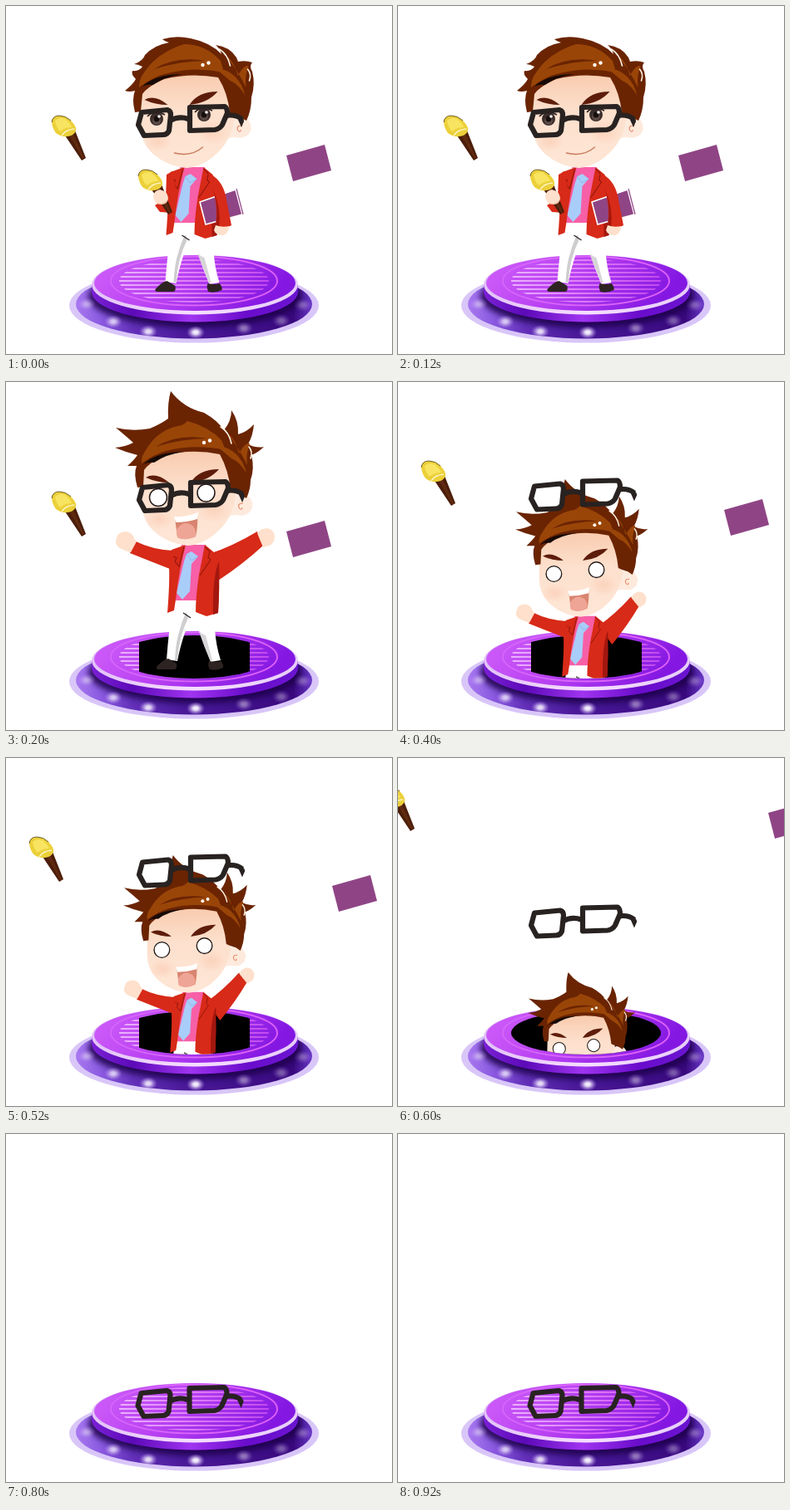
Recreate the animation shown at these times as an HTML page. Size 464x419 px, loop 1 s.

```html
<!DOCTYPE html>
<html lang="en">
<head>
<meta charset="utf-8">
<title>Trapdoor stage</title>
<style>
html, body { margin: 0; width: 100%; height: 100%; overflow: hidden; background: #fff; }
svg { display: block; width: 100vw; height: 100vh; }
</style>
</head>
<body>
<svg viewBox="0 0 464 419" xmlns="http://www.w3.org/2000/svg">
<defs>
  <linearGradient id="base">
    <stop offset="0" stop-color="#a878f0"/><stop offset=".1" stop-color="#8c5ce2"/>
    <stop offset=".24" stop-color="#6230b8"/><stop offset=".45" stop-color="#4a1a9a"/>
    <stop offset=".75" stop-color="#3f0f88"/><stop offset=".92" stop-color="#38087c"/>
    <stop offset="1" stop-color="#6a38c8"/>
  </linearGradient>
  <linearGradient id="side">
    <stop offset="0" stop-color="#7a20d4"/><stop offset=".2" stop-color="#5c0ab8"/>
    <stop offset=".48" stop-color="#a034f0"/><stop offset=".75" stop-color="#6a0ccc"/>
    <stop offset="1" stop-color="#6a14d0"/>
  </linearGradient>
  <linearGradient id="top" x2="1" y2=".25">
    <stop offset="0" stop-color="#d060fa"/><stop offset=".5" stop-color="#b840f2"/>
    <stop offset="1" stop-color="#8418e2"/>
  </linearGradient>
  <linearGradient id="rim">
    <stop offset="0" stop-color="#e2c2fa"/><stop offset=".5" stop-color="#f6defe"/>
    <stop offset="1" stop-color="#e6ccfb"/>
  </linearGradient>
  <linearGradient id="line" gradientUnits="userSpaceOnUse" x1="136" x2="316" y1="0" y2="0">
    <stop offset="0" stop-color="#f8d2ff"/><stop offset=".5" stop-color="#ec94fa"/>
    <stop offset="1" stop-color="#d656f2"/>
  </linearGradient>
  <linearGradient id="ring">
    <stop offset="0" stop-color="#d466fa"/><stop offset="1" stop-color="#e263f8"/>
  </linearGradient>
  <radialGradient id="glow">
    <stop offset="0" stop-color="#fff"/><stop offset=".3" stop-color="#f4eaff" stop-opacity=".9"/>
    <stop offset="1" stop-color="#b48cf0" stop-opacity="0"/>
  </radialGradient>
  <radialGradient id="blush">
    <stop offset="0" stop-color="#f8bfa4" stop-opacity=".45"/><stop offset="1" stop-color="#f8bfa4" stop-opacity="0"/>
  </radialGradient>
  <linearGradient id="skin" x2="0" y2="1">
    <stop offset="0" stop-color="#f8cbae"/><stop offset=".4" stop-color="#fde0cd"/>
    <stop offset="1" stop-color="#fee6d6"/>
  </linearGradient>
  <filter id="soft" x="-20%" y="-40%" width="140%" height="180%"><feGaussianBlur stdDeviation="3.5"/></filter>
  <clipPath id="deck"><ellipse cx="226" cy="331" rx="90" ry="26"/></clipPath>
  <clipPath id="baseClip"><ellipse cx="226" cy="359" rx="142" ry="41.5"/></clipPath>
  <clipPath id="above"><path d="M0 0H464V331H316A90 26 0 0 1 136 331H0Z"/></clipPath>
  <clipPath id="slot"><rect x="160" y="300" width="133" height="62"/></clipPath>

  <g id="mic">
    <path d="M71 156L83 150L96 183L91 186Z" fill="#4c1e0a"/>
    <path d="M76 155L80 153L94 183L92 184Z" fill="#5f2a10"/>
    <path d="M55 139Q56 132 64 132Q72 132 78 138Q85 145 84 150Q82 156 74 157Q66 158 60 153Q55 146 55 139Z" fill="#ecd03a"/>
    <path d="M59 138Q64 133 71 136Q78 142 79 146Q71 146 65 151Q60 146 59 138Z" fill="#f8e460"/>
    <path d="M67 156Q71 149 82 148" fill="none" stroke="#fbf2c0" stroke-width="1.6"/>
    <path d="M55 140Q56 132 64 132Q72 132 78 138" fill="none" stroke="#4a3c18" stroke-width=".8"/>
  </g>
  <path id="book" d="M337 180L383 167L391 198L345 211Z" fill="#8f4585"/>
</defs>

<g id="stage">
  <ellipse cx="226" cy="360.5" rx="150" ry="45" fill="#d9c6f8"/>
  <ellipse cx="226" cy="359" rx="142" ry="41.5" fill="url(#base)"/>
  <g clip-path="url(#baseClip)">
    <ellipse cx="227" cy="350" rx="128" ry="37" fill="#1c0348" opacity=".85" filter="url(#soft)"/>
    <g id="lights"></g>
  </g>
  <path d="M103 335V344.5A124 36 0 0 0 351 344.5V335Z" fill="url(#side)"/>
  <ellipse cx="227" cy="335.5" rx="124" ry="36" fill="url(#rim)"/>
  <ellipse cx="227" cy="333.5" rx="121" ry="33.5" fill="url(#top)"/>
  <ellipse cx="226" cy="331" rx="100" ry="29.5" fill="none" stroke="url(#ring)" stroke-width="1.8"/>
  <g id="stripes" clip-path="url(#deck)" stroke="url(#line)" stroke-width="1.7"></g>
</g>
<ellipse id="hole" cx="226" cy="331" rx="90" ry="26"/>

<g id="clip"><g id="man">
  <g id="legs">
    <path d="M201 262H230L226 278Q213 300 206 336L193 334Q196 296 201 262Z" fill="#fff"/>
    <path d="M214 263H253L251 296Q252 316 258 335L246 337Q238 318 232 300L219 276Z" fill="#fff"/>
    <path d="M217 277Q212 286 209 298Q204 312 203 335H206Q208 306 219 284Z" fill="#cfcdd0"/>
    <path d="M232 300Q236 304 240 305L248 335L246 336Q238 318 232 300Z" fill="#d7d5d8"/>
    <path d="M213 278L222 284" stroke="#2b2324" stroke-width="1.4"/>
    <path d="M181 343Q189 334 195 333L205 339Q206 345 203 346H184Q180 346 181 343Z" fill="#2d2422"/>
    <path d="M244 336Q252 338 258 336Q262 340 261 344Q253 348 245 346Q242 341 244 336Z" fill="#2d2422"/>
  </g>
  <path d="M211 196H240L234 263H202Z" fill="#f75fa6"/>
  <path d="M217 207L223 204L231 210L223 219L221 252L212 262L205 254L214 216Z" fill="#a9cdf9"/>
  <path d="M217 207L223 215L231 210" fill="none" stroke="#8db6ec"/>
  <g id="armsUp" fill="#d72a18">
    <path d="M154 191Q176 202 201 203L197 225Q174 216 149 206Z"/>
    <path d="M133 188Q134 181 143 180Q151 180 154 188L157 192L150 205Q142 203 135 199Q130 194 133 188Z" fill="#fee0cc"/>
    <g id="rightArm">
      <path d="M244 207Q272 198 302 180L309 197Q284 220 255 239Z"/>
      <path d="M302 182Q306 176 314 176Q323 178 323 187Q322 195 316 197L309 199Z" fill="#fee0cc"/>
    </g>
  </g>
  <path d="M199 202L216 196Q208 226 204 262L202 275L194 278Q197 240 196 222Z" fill="#d72a18"/>
  <path d="M239 196L250 205Q258 224 255 278L241 282L228 277Q228 258 232 232Z" fill="#d72a18"/>
  <path d="M214 198L208 222L203 216L205 212L201 210M239 198L245 204L243 211L246 214L233 233" fill="none" stroke="#94160e" stroke-width="1.1"/>
  <path d="M256 216Q248 234 249 280L255 278Q257 246 256 216Z" fill="#a3170f"/>
  <g id="hold" transform="translate(1.5 2)">
    <path d="M233 236L276 221L284 251L240 263Z" fill="#8f4585" stroke="#fff" stroke-width="1.6"/>
    <path d="M277 220L285 251" stroke="#8f4585" stroke-width="1.2"/>
    <path d="M243 201Q259 208 264 228L271 264Q261 270 252 266Q255 242 249 222Z" fill="#d72a18"/>
    <path d="M249 222Q256 241 252 266L256 267Q259 242 249 222Z" fill="#a3170f"/>
    <path d="M252 264Q260 267 268 265Q268 274 261 276Q252 276 250 270Z" fill="#fee0cc"/>
    <path d="M200 199L193 203L192 232L179 240L185 248L199 249L205 224Z" fill="#d72a18"/>
    <use href="#mic" x="104" y="65"/>
    <path d="M177 229Q178 222 185 221Q194 223 195 231Q195 238 187 239Q178 239 177 229Z" fill="#fee0cc"/>
    <path d="M183 238Q190 240 194 234" fill="none" stroke="#e8b095"/>
  </g>

  <g id="head">
    <path d="M272 139Q280 131 290 136Q299 144 295 154Q289 163 277 160L268 161Z" fill="#feeadd"/>
    <path d="M285 146Q278 146 280 151Q283 156 284 151" fill="none" stroke="#e58a68" stroke-width="1.2"/>
    <path d="M164 98Q200 76 262 86L276 110Q280 150 262 172Q243 195 219 197Q194 195 176 178Q164 166 163 146Z" fill="url(#skin)"/>
    <ellipse cx="184" cy="165" rx="18" ry="13" fill="url(#blush)"/>
    <ellipse cx="250" cy="154" rx="20" ry="15" fill="url(#blush)"/>
    <g id="calmHair" transform="translate(1.5 2)" fill="#6a2402">
      <path d="M162 127L155 128Q151 112 155 102Q148 104 143 102Q153 94 156 88Q150 82 152 78Q160 79 164 73Q158 70 154 70Q165 66 167 59Q178 47 196 44Q190 42 188 40Q204 35 222 39Q246 44 259 58Q257 51 252 47Q269 49 277 62L279 67Q288 65 296 68Q292 72 296 79Q300 94 295 110Q295 126 289 138L283 135Q276 133 269 129Q267 105 255 86Q222 80 190 88Q170 97 164 106Z"/>
      <path d="M166 80Q182 56 214 46Q240 46 258 66L262 80Q226 72 190 82Q176 86 160 98Q160 88 166 80Z" fill="#9a4508"/>
      <path d="M178 76Q204 60 240 66Q210 66 178 76Z" fill="#6a2402"/>
    </g>
    <g id="wildHair" fill="#6a2402">
      <path d="M165 126L158 127Q153 110 157 101L146 101Q154 94 158 88Q145 85 131 79Q144 78 153 73Q144 65 132 55Q152 60 173 56Q187 50 195 44Q194 25 198 11Q213 31 238 37Q254 46 262 58Q271 47 271 34Q280 47 279 63Q290 60 298 51Q297 64 291 75Q301 80 310 78Q303 85 295 88Q299 104 294 118Q294 129 289 140L283 136Q276 134 270 131Q268 107 257 87Q224 80 191 88Q172 97 166 106Z"/>
      <path d="M168 82Q182 58 207 53Q214 52 218 47Q244 54 259 70L264 82Q226 74 192 83Q178 87 163 98Q162 90 168 82Z" fill="#9a4508"/>
      <path d="M180 78Q206 62 242 68Q212 68 180 78Z" fill="#6a2402"/>
    </g>
    <path d="M164 100Q180 84 214 84Q192 87 178 97Q170 96 164 100Z" fill="#160a07"/>
    <path d="M252 76Q282 80 289 110Q281 96 271 92ZM264 60Q276 68 280 86Q288 72 293 74Q288 88 290 100Q278 76 264 60Z" fill="#9a4508"/>
    <path d="M258 54Q268 60 271 74M292 78Q297 84 294 92" fill="none" stroke="#fff3e4" stroke-width="1.6" stroke-linecap="round"/>
    <circle cx="238" cy="73" r="2.2" fill="#fff"/><circle cx="245" cy="70.5" r="2.2" fill="#fff"/>
    <path d="M168 115Q180 108 196 121Q181 121 168 115ZM256 105Q232 105 222 121Q244 119 256 105Z" fill="#5e1d0b"/>
    <g id="calmFace">
      <g id="irises"></g>
      <path d="M204 179Q224 184 238 172" fill="none" stroke="#c87a5c" stroke-width="1.4" stroke-linecap="round"/>
    </g>
    <g id="shock">
      <g fill="#fff" stroke="#221a18" stroke-width="1.5">
        <circle cx="183" cy="139" r="10.5"/><circle cx="240.5" cy="133.5" r="10.5"/>
      </g>
      <path d="M203 164Q217 164 230 158Q231 174 228 186Q216 192 206 187Z" fill="#d88470"/>
      <path d="M202 162Q217 163 231 157L230 165Q217 169 204 169Z" fill="#fff"/>
      <path d="M205 178Q212 167 221 171Q229 174 228 186Q216 192 206 187Z" fill="#efa596"/>
    </g>
  </g>
</g></g>

<g id="glasses" fill="none" stroke="#282221" stroke-width="6.2" stroke-linejoin="round">
  <path d="M164 127L195 124Q199 125 199 130L197 149Q195 154 190 154L167 155L160 142Z"/>
  <path d="M222 121L264 120Q267 122 267 128L261 142Q258 147 252 148L222 149Z"/>
  <path d="M198 137Q209 131 220 135"/>
  <path d="M265 131Q277 129 284 135"/>
  <path d="M279 131Q288 133 287 138L284 145L280 136Z" fill="#282221" stroke="none"/>
</g>
<use id="flyMic" href="#mic"/>
<use id="flyBook" href="#book"/>
</svg>
<script>
const $ = id => document.getElementById(id);
const STEP = 200;

// x, y, opacity
const lights = [[97, 359, .45], [129, 380, .75], [171, 392, .9], [228, 393, 1],
  [286, 388, .45], [331, 379, .35], [357, 360, .3]];
$('lights').innerHTML = lights.map(([x, y, o]) =>
  `<ellipse cx="${x}" cy="${y}" rx="11" ry="8" fill="url(#glow)" opacity="${o}"/>`).join('');

let rows = '';
for (let y = 306; y <= 356; y += 5) rows += `<path d="M136 ${y}H316"/>`;
$('stripes').innerHTML = rows;

$('irises').innerHTML = [[182.5, 138], [239.5, 133]].map(([x, y]) => `
  <g transform="translate(${x} ${y})">
    <circle r="8" fill="#3a2c2a"/><circle cy="2" r="5" fill="#5c4a46"/><circle r="3.4" fill="#16100f"/>
    <circle cx="3" cy="-3" r="1.8" fill="#fff"/>
    <path d="M-11 -3Q-3 -12 10 -5" fill="none" stroke="#2a1c19" stroke-width="1.6"/>
  </g>`).join('');

// man: [x, y, scale]; other entries are offsets, null hides the part
const poses = [
  { man: [-1.5, -2, 1], glasses: [-1, 1], mic: [0, 0], book: [0, 0], calm: true },
  { man: [0, 0, 1], glasses: [0, 0], mic: [0, 0], book: [0, 0], hole: 'slot' },
  { man: [24.5, 107.3, .89], glasses: [0, -1.5], mic: [-27, -37], book: [55, -26], hole: 'slot', sink: true, raise: true },
  { man: [62, 250, .72], glasses: [0, 59.5], mic: [-76, -98], book: [108, -114], hole: 'full', sink: true },
  { man: null, glasses: [-1.5, 185], mic: null, book: null }
];

const show = (id, on) => $(id).style.display = on ? '' : 'none';

function place(id, at) {
  show(id, at);
  if (at) $(id).setAttribute('transform', `translate(${at[0]} ${at[1]}) scale(${at[2] || 1})`);
}

function draw(ms) {
  const p = poses[Math.floor(ms / STEP) % poses.length];
  place('man', p.man);
  place('glasses', p.glasses);
  place('flyMic', p.mic);
  place('flyBook', p.book);
  for (const id of ['calmHair', 'calmFace', 'hold']) show(id, p.calm);
  for (const id of ['wildHair', 'shock', 'armsUp']) show(id, !p.calm);
  show('hole', p.hole);
  $('hole').setAttribute('clip-path', p.hole === 'slot' ? 'url(#slot)' : 'none');
  $('clip').setAttribute('clip-path', p.sink ? 'url(#above)' : 'none');
  $('rightArm').setAttribute('transform', p.raise
    ? 'translate(250 212) rotate(-17) scale(.92) translate(-250 -212)' : '');
}

const start = performance.now();
function tick() {
  draw(performance.now() - start);
  requestAnimationFrame(tick);
}
tick();
</script>
</body>
</html>
```
